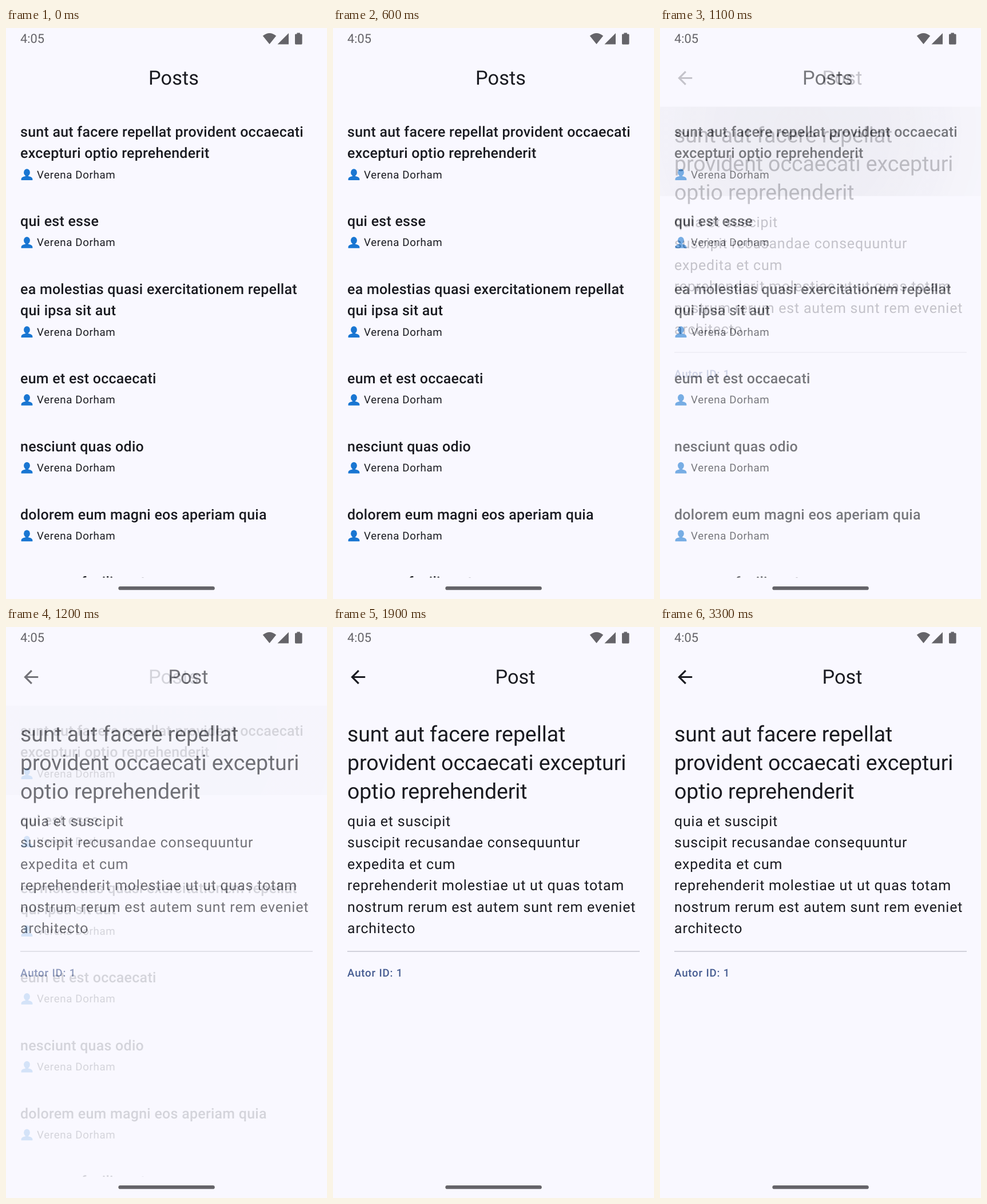
Animation, 561 px wide and 998 px high, one loop 3600 ms. Source, as an HTML page:

```html
<!DOCTYPE html>
<html lang="la">
<head>
<meta charset="utf-8">
<title>Posts</title>
<style>
  html, body { margin: 0; width: 100%; height: 100%; overflow: hidden; background: #f9f8ff; }
  svg { display: block; width: 100vw; height: 100vh; }
  text { font-family: Roboto, "Open Sans", sans-serif; fill: #1a1b21; white-space: pre; text-rendering: geometricPrecision; }
  .bar { font-size: 34.375px; text-anchor: middle; }
  .title { font-size: 25px; font-weight: 500; letter-spacing: .234px; }
  .name { font-size: 18.75px; letter-spacing: .625px; }
  .head { font-size: 37.5px; letter-spacing: -.1px; }
  .body { font-size: 25px; letter-spacing: .78px; }
  .label { font-size: 18.75px; font-weight: 500; letter-spacing: .78px; fill: #475d92; }
  .clock { font-size: 21.875px; fill: #656469; }
</style>
</head>
<body>
<svg viewBox="0 0 561 998">
  <defs>
    <clipPath id="listClip"><rect y="137.5" width="561" height="823"/></clipPath>
    <clipPath id="itemClip"><rect y="137.5" width="561" height="156.25"/></clipPath>
    <radialGradient id="soft">
      <stop offset="0" stop-color="#1a1b21"/>
      <stop offset=".4" stop-color="#1a1b21" stop-opacity=".8"/>
      <stop offset="1" stop-color="#1a1b21" stop-opacity="0"/>
    </radialGradient>
    <g id="person" fill="#1976d2">
      <ellipse cx="11.5" cy="-3.6" rx="5.4" ry="6.3"/>
      <path d="M1.6 10V8.2C1.6 4.8 5.4 3.6 9 2.9V0h5v2.9c3.6 .7 7.4 1.9 7.4 5.3V10z"/>
    </g>
  </defs>
  <rect width="561" height="998" fill="#f9f8ff"/>
  <g id="list">
    <g id="items" clip-path="url(#listClip)">
      <g clip-path="url(#itemClip)"><circle id="ripple" cx="249" cy="179" fill="url(#soft)" opacity=".09"/></g>
    </g>
  </g>
  <g id="detail">
    <rect width="561" height="998" fill="#f9f8ff"/>
    <path transform="translate(25 68.75) scale(1.5625)" fill="#1a1b21"
      d="M20 11H7.83l5.59-5.59L12 4l-8 8 8 8 1.41-1.41L7.83 13H20z"/>
    <rect x="25" y="566.2" width="511" height="1.5" fill="#c5c6d0"/>
  </g>
  <g id="system" fill="#656469">
    <path d="M460.5 28.3L448.8 13.7Q460.5 4.3 472.2 13.7z"/>
    <path d="M474.5 28.5H494V9z"/>
    <path d="M508.5 8.5h5.4v2h2.3q1.4 0 1.4 1.4v15.4q0 1.4-1.4 1.4h-9.8q-1.4 0-1.4-1.4V11.9q0-1.4 1.4-1.4h2.1z"/>
    <rect x="196.4" y="976" width="168.4" height="6.3" rx="3.15"/>
  </g>
</svg>
<script>
const $ = id => document.getElementById(id);
const NS = "http://www.w3.org/2000/svg";

function add(parent, tag, attrs) {
  const el = document.createElementNS(NS, tag);
  for (const key in attrs) el.setAttribute(key, attrs[key]);
  return parent.appendChild(el);
}

// Places a line of text around its vertical centre.
function line(parent, cls, x, mid, str) {
  const el = add(parent, "text", { class: cls, x });
  el.textContent = str;
  el.setAttribute("y", mid + parseFloat(getComputedStyle(el).fontSize) * 0.3413);
}

const posts = [
  ["sunt aut facere repellat provident occaecati", "excepturi optio reprehenderit"],
  ["qui est esse"],
  ["ea molestias quasi exercitationem repellat", "qui ipsa sit aut"],
  ["eum et est occaecati"],
  ["nesciunt quas odio"],
  ["dolorem eum magni eos aperiam quia"],
  ["magnam facilis autem"]
];

const list = $("list"), items = $("items"), detail = $("detail"), ripple = $("ripple");

line(list, "bar", 293, 87.5, "Posts");
let y = 181.25;
for (const rows of posts) {
  for (const row of rows) {
    line(items, "title", 25, y, row);
    y += 37.5;
  }
  add(items, "use", { href: "#person", x: 25, y: y - 0.2 });
  line(items, "name", 54.1, y, "Verena Dorham");
  y += 81.25;
}

line(detail, "bar", 318.5, 87.5, "Post");
["sunt aut facere repellat", "provident occaecati excepturi", "optio reprehenderit"]
  .forEach((s, i) => line(detail, "head", 25, 187.5 + i * 50, s));
["quia et suscipit", "suscipit recusandae consequuntur", "expedita et cum",
  "reprehenderit molestiae ut ut quas totam",
  "nostrum rerum est autem sunt rem eveniet", "architecto"]
  .forEach((s, i) => line(detail, "body", 25, 339.2 + i * 37.5, s));
line(detail, "label", 25, 605, "Autor ID: 1");
line($("system"), "clock", 25, 18.6, "4:05");

const LOOP = 3600, STEP = 100;
const FADE_AT = 925, FADE = 700;
const RIPPLE_AT = 985, RIPPLE_SPEED = 3.5;
const clamp = v => Math.min(1, Math.max(0, v));

// cubic-bezier(.4, 0, .2, 1)
function ease(x) {
  if (x <= 0 || x >= 1) return clamp(x);
  let lo = 0, hi = 1;
  for (let i = 0; i < 24; i++) {
    const u = (lo + hi) / 2, v = 1 - u;
    if (1.2 * v * v * u + 0.6 * v * u * u + u ** 3 < x) lo = u; else hi = u;
  }
  return 3 * (1 - lo) * lo * lo + lo ** 3;
}

function draw(time) {
  const t = Math.floor(time % LOOP / STEP) * STEP;
  const p = ease((t - FADE_AT) / FADE);
  list.setAttribute("opacity", 1 - p);
  detail.setAttribute("opacity", p);
  ripple.setAttribute("r", Math.max(0, (t - RIPPLE_AT) * RIPPLE_SPEED));
}

const start = performance.now();
function tick() {
  draw(performance.now() - start);
  requestAnimationFrame(tick);
}
draw(0);
requestAnimationFrame(tick);
</script>
</body>
</html>
```
